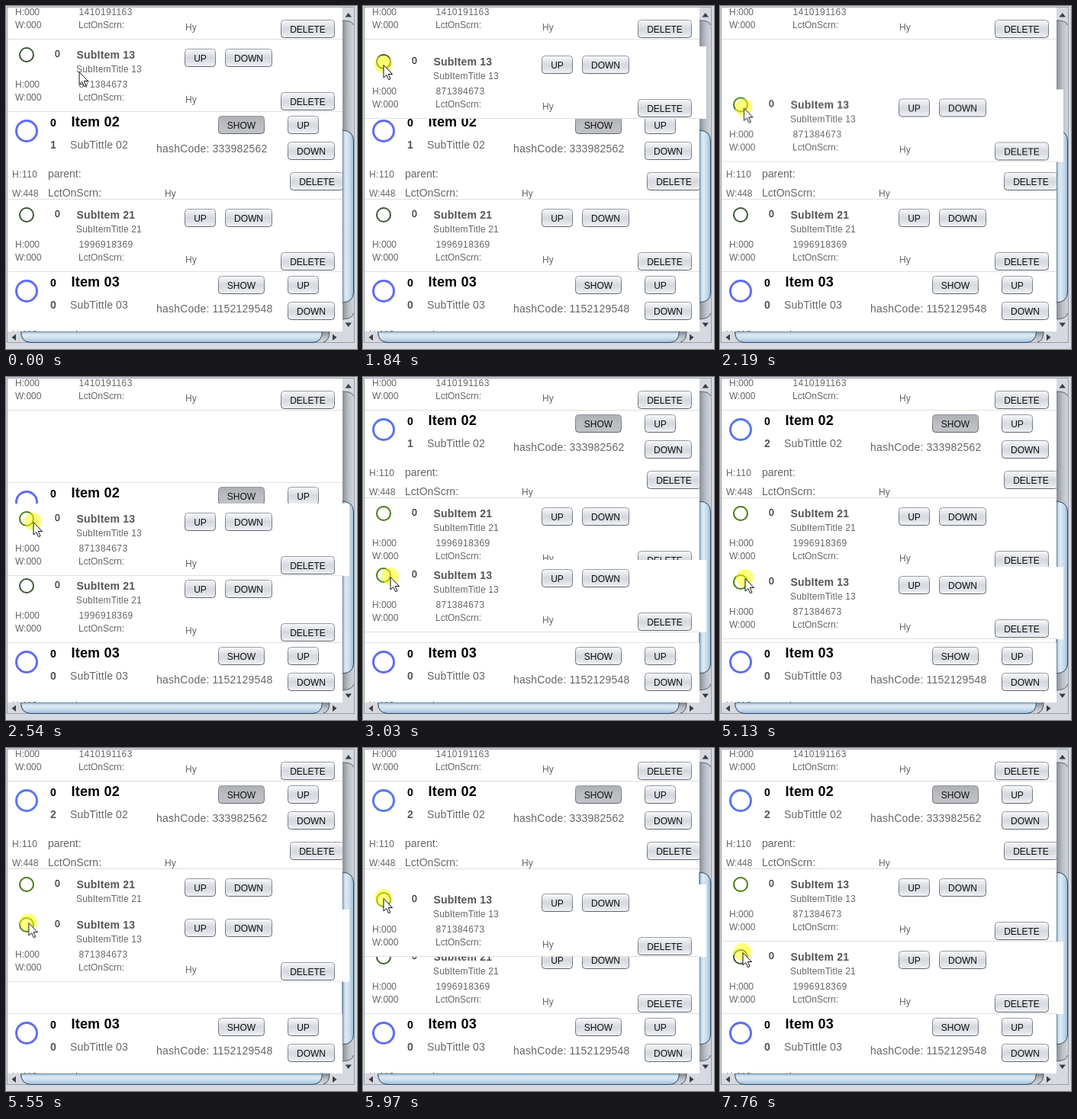
Animation of 460x450 px, one loop 8000 ms. Source, as an HTML page:

```html
<!DOCTYPE html>
<html lang="en">
<head>
<meta charset="utf-8">
<title>Drag and drop list</title>
<style>
html, body { margin: 0; width: 100%; height: 100%; overflow: hidden; background: #d6d9df; }
svg { display: block; width: 460px; height: 450px; }
text { font: 12px "Liberation Sans", Arial, sans-serif; fill: #666; white-space: pre; }
.mid { font-size: 14px; }
.bold { font-size: 14px; font-weight: bold; fill: #555; letter-spacing: .2px; }
.head { font-size: 18px; font-weight: bold; letter-spacing: .2px; }
.dark, .head { fill: #000; }
.loose { letter-spacing: .15px; }
.num { letter-spacing: .45px; }
.hash { letter-spacing: .2px; }
.label { fill: #111; text-anchor: middle; }
.line { fill: #dfdfdf; }
.ring { fill: none; }
.small { stroke: #3b5a33; stroke-width: 2; }
.large { stroke: #606df0; stroke-width: 3; }

/* One loop is 8000 ms, so 1% is 80 ms; pointer samples are 70 ms apart. */
.anim { animation: 8s linear -8ms infinite; }
.hard { animation-timing-function: step-end; }
.pointer { animation-name: pointer; }
#halo { animation-name: held; }
#item02 { animation-name: lift; }
#sub13 { animation-name: drag; }
#sub21 { animation-name: swap; }
#sub13 .wide { animation-name: held13; }
#sub21 .wide { animation-name: held21; }
#sub13 .ring { animation-name: green13; }
#sub21 .ring { animation-name: green21; }
#item02 .ring { animation-name: blue; }
.before { animation-name: before; }
.after { animation-name: after; }

@keyframes pointer {
  0% { transform: translate(96px, 86px); }
  6% { transform: translate(96px, 86px); animation-timing-function: steps(4); }
  9.5%, 22.125% { transform: translate(27px, 66px); animation-timing-function: step-end; }
  23% { transform: translate(27px, 77px); animation-timing-function: steps(10); }
  31.75% { transform: translate(36px, 190px); animation-timing-function: step-end; }
  32.625% { transform: translate(36px, 205px); animation-timing-function: steps(6); }
  37.875% { transform: translate(36px, 262px); }
  44.5% { transform: translate(36px, 262px); animation-timing-function: steps(5); }
  48.875%, 63.25% { transform: translate(36px, 272px); animation-timing-function: step-end; }
  64.125% { transform: translate(33px, 264px); animation-timing-function: steps(11); }
  73.75% { transform: translate(27px, 200px); animation-timing-function: step-end; }
  74.625% { transform: translate(27px, 197px); }
  80.5% { transform: translate(27px, 197px); animation-timing-function: steps(6); }
  85.75% { transform: translate(24px, 232px); animation-timing-function: steps(6); }
  91%, 100% { transform: translate(30px, 268px); }
}
@keyframes drag {
  0%, 22.125% { transform: translateY(44px); animation-timing-function: step-end; }
  23% { transform: translateY(53px); animation-timing-function: steps(10); }
  31.75% { transform: translateY(166px); animation-timing-function: step-end; }
  32.625% { transform: translateY(182px); animation-timing-function: steps(6); }
  37.875% { transform: translateY(240px); animation-timing-function: step-end; }
  42%, 63.25% { transform: translateY(254px); animation-timing-function: step-end; }
  64.125% { transform: translateY(249px); animation-timing-function: steps(11); }
  73.75% { transform: translateY(181px); animation-timing-function: step-end; }
  74.625% { transform: translateY(179px); animation-timing-function: step-end; }
  78%, 100% { transform: translateY(159px); }
}
@keyframes lift {
  0% { transform: translateY(139px); }
  32.625%, 100% { transform: translateY(44px); }
}
@keyframes swap {
  0%, 72%, 100% { transform: translateY(254px); }
  32.625% { transform: translateY(159px); }
}
@keyframes held {
  0%, 42%, 78% { opacity: 0; }
  12.75%, 51.375%, 92.625%, 100% { opacity: 1; }
}
@keyframes held13 {
  0%, 42%, 78%, 100% { opacity: 0; }
  12.75%, 51.375% { opacity: 1; }
}
@keyframes held21 {
  0% { opacity: 0; }
  92.625%, 100% { opacity: 1; }
}
@keyframes before { 0% { opacity: 1; } 42%, 100% { opacity: 0; } }
@keyframes after { 0% { opacity: 0; } 42%, 100% { opacity: 1; } }
@keyframes green13 { 0% { stroke: #3b5a33; } 23.875%, 100% { stroke: #46800f; } }
@keyframes green21 { 0%, 72%, 100% { stroke: #3b5a33; } 32.625% { stroke: #467a10; } }
@keyframes blue { 0% { stroke: #606df0; } 32.625%, 100% { stroke: #5877ee; } }
</style>
</head>
<body>
<svg id="stage" viewBox="0 0 460 450"></svg>
<script>
const text = (x, y, str, cls = '') => `<text x="${x}" y="${y}" class="${cls}">${str}</text>`;
const rect = (x, y, w, h, attrs) => `<rect x="${x}" y="${y}" width="${w}" height="${h}" ${attrs}/>`;
const line = y => rect(2, y, 439, 1, 'class="line"');
const ring = (y, r, size) => `<circle cx="27" cy="${y}" r="${r}" class="ring ${size} anim hard"/>`;
const gradient = (id, vertical, ...stops) =>
  `<linearGradient id="${id}" x2="${vertical ? 0 : 1}" y2="${vertical ? 1 : 0}">` +
  stops.map((c, i) => `<stop offset="${i / (stops.length - 1)}" stop-color="${c}"/>`).join('') +
  '</linearGradient>';

const button = (x, y, w, label, pressed) =>
  rect(x + .5, y + .5, w - 1, 23, `rx="4" fill="url(#${pressed ? 'down' : 'face'})" stroke="url(#edge)"`) +
  text(x + w / 2, y + 17, label, 'label');

const subItem = (num, hash) =>
  rect(2, 0, 439, 95, 'fill="#fff"') +
  rect(3, 0, 447, 95, 'fill="#fff" class="wide anim hard" opacity="0"') +
  line(94) + ring(20, 9, 'small') +
  text(64, 23, '0', 'dark') +
  text(92.5, 25, 'SubItem ' + num, 'bold') +
  text(92, 43, 'SubItemTitle ' + num, 'loose') +
  text(12, 63, 'H:000') + text(95.5, 63, hash, 'num') +
  text(12, 80, 'W:000') + text(95, 80, 'LctOnScrn:') +
  text(235, 83, 'Hy') +
  button(234, 12, 41, 'UP') + button(287, 12, 62, 'DOWN') + button(360, 69, 71, 'DELETE');

const item = (num, hash, counts, pressed) =>
  rect(2, 0, 439, 115, 'fill="#fff"') +
  line(-1) + line(114) + ring(25, 13.5, 'large') +
  text(58, 19, '0', 'bold dark') + text(85.5, 19, 'Item ' + num, 'head') +
  counts + text(84, 48, 'SubTittle ' + num, 'mid loose') +
  text(197, 53, 'hashCode: ' + hash, 'mid hash') +
  text(8, 86, 'H:110', 'num') + text(55, 86, 'parent:', 'mid') +
  text(8, 111, 'W:448') + text(55, 111, 'LctOnScrn:', 'mid') + text(208, 111, 'Hy') +
  button(278, 5, 61, 'SHOW', pressed) + button(369, 5, 41, 'UP') +
  button(369, 39, 62, 'DOWN') + button(372, 79, 71, 'DELETE');

const scrollbars =
  rect(441, 2, 15, 425, 'fill="url(#trackV)"') +
  rect(2, 427, 439, 14, 'fill="url(#trackH)"') +
  '<path d="M441 2H456V25Q455 19 441 19Z" fill="#d6d9df"/>' +
  '<path d="M441 427H456V404Q455 410 441 411Z" fill="#d6d9df"/>' +
  '<path d="M441 411Q455 410 455.5 403M441 19Q454 19 455.5 25" fill="none" stroke="#5d6269"/>' +
  '<path d="M2 427H19Q19 440 26 441H2Z" fill="#d6d9df"/>' +
  '<path d="M441 427H424Q424 440 417 441H441Z" fill="#d6d9df"/>' +
  '<path d="M424 427Q424 439 416 441" fill="none" stroke="#4c5158"/>' +
  rect(441, 427, 15, 14, 'fill="#d6d9df"') +
  '<path d="M441 163Q455.5 164 455.5 177V376Q455.5 388 441 389Z" fill="url(#thumbV)" stroke="#2f4a63"/>' +
  '<path d="M19.5 427Q20 441 32 441.5H402Q414 441 414.5 427Z" fill="url(#thumbH)" stroke="#2f4a63"/>' +
  '<path d="M444.500 14.500H453L448.700 9ZM444.500 415.500H453L448.700 421ZM13 430.500V439L7.500 434.700ZM428 430.500V439L433.500 434.700Z" fill="#3a3e45"/>';

document.getElementById('stage').innerHTML =
  '<defs>' +
  gradient('face', true, '#fafbfc', '#e6e8ec', '#d5d8de', '#dfe2e7', '#f2f4f7') +
  gradient('down', true, '#adafb4', '#bbbdc1', '#c0c2c6') +
  gradient('edge', true, '#969aa2', '#7d8189', '#60646c') +
  gradient('trackV', false, '#898f97', '#b9bec5', '#d3d6dc') +
  gradient('trackH', true, '#7d838b', '#b9bec5', '#d3d6dc') +
  gradient('thumbV', false, '#a4bfd6', '#dfebf5', '#c6dbec', '#9bbbd7') +
  gradient('thumbH', true, '#a4bfd6', '#dfebf5', '#c6dbec', '#9bbbd7') +
  '<clipPath id="view"><rect x="2" y="2" width="439" height="425"/></clipPath></defs>' +
  rect(1.5, 1.5, 455, 440, 'fill="#fff" stroke="#989da6"') +
  scrollbars +
  '<g clip-path="url(#view)">' +
  `<g transform="translate(0 -51)">${subItem('12', '1410191163')}</g>` +
  `<g id="item02" class="anim hard">${item('02', '333982562',
    text(58, 48, '1', 'bold anim hard before') + text(58, 48, '2', 'bold anim hard after'), true)}</g>` +
  `<g transform="translate(0 349)">${item('03', '1152129548', text(58, 48, '0', 'bold'))}</g></g>` +
  `<g id="sub21" class="anim hard">${subItem('21', '1996918369')}</g>` +
  `<g id="sub13" class="anim">${subItem('13', '871384673')}</g>` +
  '<g id="halo" class="anim hard"><g class="anim pointer">' +
  '<circle cx="-.5" cy="-.5" r="11.500" fill="#ff0" fill-opacity=".52"/></g></g>' +
  '<g class="anim pointer"><path d="M0 .5V17L3.800 13.500L6.500 19.700L9 18.600L6.300 12.500H11.500Z" fill="#fff" stroke="#111"/></g>';
</script>
</body>
</html>
```
